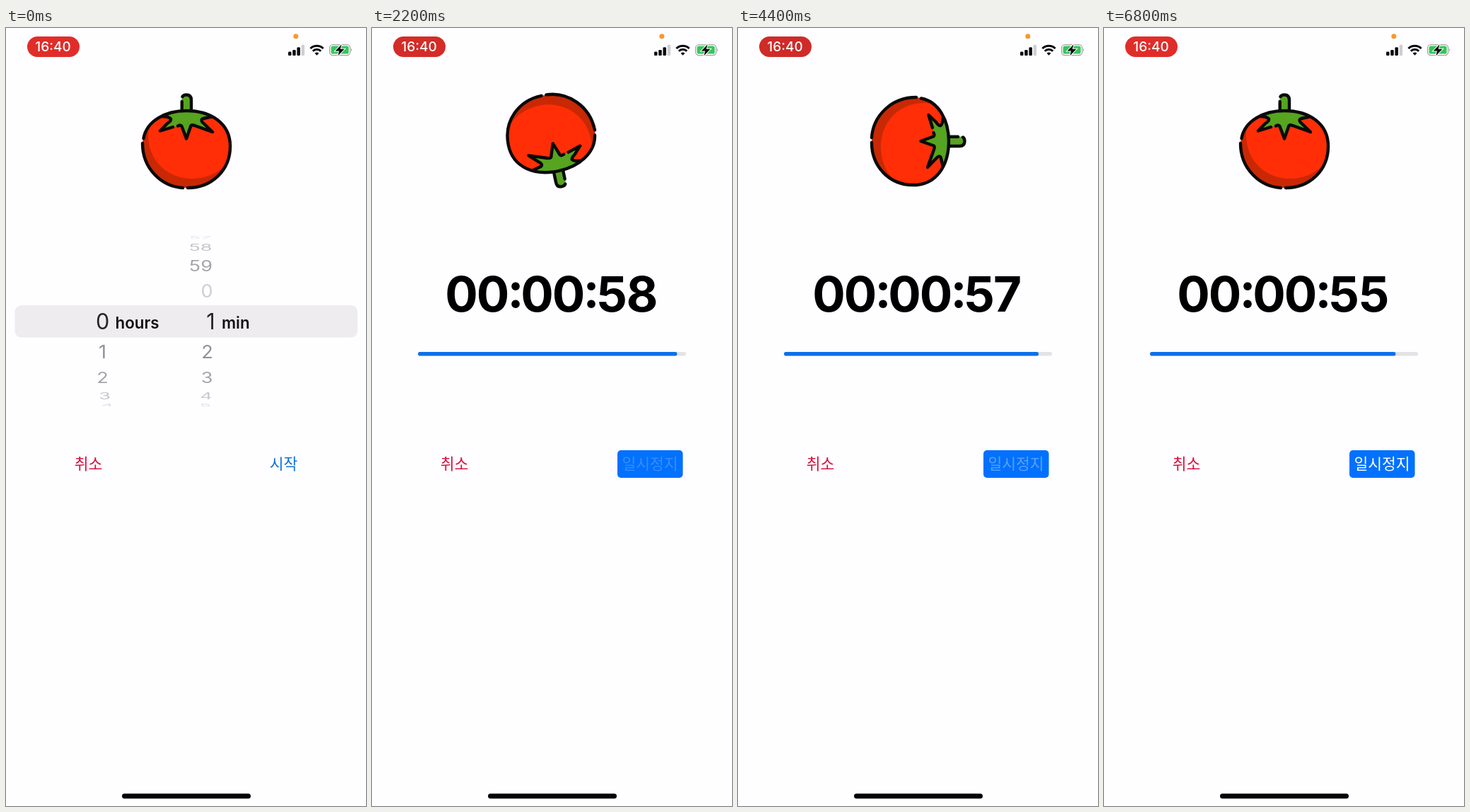
These frames come from a looping animation (509x1100 px, 6.9 s). An HTML page:

```html
<!DOCTYPE html>
<html lang="ko">
<head>
<meta charset="utf-8">
<title>Tomato timer</title>
<style>
  html, body { margin: 0; width: 100%; height: 100%; overflow: hidden; background: #fefdff; }
  svg { display: block; width: 100%; height: 100%; }
  text { font-family: Inter, Roboto, sans-serif; text-anchor: middle; }
  .ko { font: 400 21.5px "Noto Sans CJK KR", "Noto Sans CJK", sans-serif; }
  .unit { font-size: 22.3px; font-weight: 600; fill: #111; text-anchor: start; }
  .picked { font-size: 30.5px; fill: #252427; }
  #wheels { font-size: 27px; }
  #clock { font-size: 69px; font-weight: 700; font-feature-settings: "calt" 0; }
  .line { fill: none; stroke: #0b0a0a; stroke-width: 4.4; stroke-linecap: round; stroke-linejoin: round; }
</style>
</head>
<body>
<svg viewBox="0 0 509 1100">
  <defs>
    <path id="body" d="M255 117C290 117 317 135 317 167C317 202 290 226 255 226C220 226 193 200 193 165C193 137 220 117 255 117Z"/>
    <clipPath id="inBody"><use href="#body"/></clipPath>
  </defs>

  <!-- status bar -->
  <rect id="pill" x="30" y="12" width="74" height="29" rx="14.5"/>
  <text x="66.5" y="33.3" font-size="19" font-weight="500" fill="#fff">16:40</text>
  <circle cx="409.8" cy="11.8" r="3.5" fill="#f69a2b"/>
  <g fill="#0b0a0c">
    <rect x="399" y="33.5" width="4.5" height="5.5" rx="1.2"/>
    <rect x="405.2" y="31" width="4.5" height="8" rx="1.2"/>
    <rect x="411.4" y="27.3" width="4.5" height="11.7" rx="1.2"/>
    <rect x="417.6" y="23.8" width="4.5" height="15.2" rx="1.2" fill="#cfced1"/>
    <path d="M436.6 35.8A4 4 0 0 1 442.4 35.8L439.5 38.8Z"/>
    <path d="M430.4 29A13 13 0 0 1 448.6 29M433.8 32.7A8 8 0 0 1 445.2 32.7" fill="none" stroke="#0b0a0c" stroke-width="3"/>
  </g>
  <rect x="457.6" y="23.6" width="29" height="15" rx="4.5" fill="none" stroke="#a5a4a8" stroke-width="1.3"/>
  <rect x="459.6" y="25.6" width="25" height="11" rx="2.6" fill="#33c65a"/>
  <path d="M488 28.6Q490.2 31 488 33.6Z" fill="#a5a4a8"/>
  <path d="M474.5 23.3L465.5 32.6H471L469.3 39.3L478.5 29.7H472.7Z" fill="#0b0a0c" stroke="#fff" stroke-width="2" paint-order="stroke"/>

  <!-- tomato -->
  <g id="tomato">
    <path d="M248.5 117V99Q249 94.5 255 94.5Q262 94.5 262 101V117Z" fill="#56a41f"/>
    <use href="#body" fill="#c92805"/>
    <g clip-path="url(#inBody)"><use href="#body" x="8" y="-13" fill="#ff2e06"/>
      <rect x="225" y="112" width="62" height="12" fill="#56a41f"/></g>
    <path d="M220 125Q236 117 255 117Q276 117 291 125L277 129L292 146L262 137L255 156L248 137.5L236 140L218 145L233 130Z" fill="#56a41f"/>
    <g class="line">
      <path d="M194.5 156C199 131 226 117 255 117C290 117 317 135 317 167C317 202 290 226 257 226"/>
      <path d="M250 226C220 224 193 199 193 163"/>
      <path d="M221 125Q230 125 233 128.5Q234 131 228 135L218 145.5L236 140M243 138.5Q247 136.5 248.5 139L255 156.5L261.5 138Q263 136.5 267 138L292 147L277.5 133Q275 129 279 128L290 125.5"/>
      <path d="M248.7 116V104M249.5 97Q251 94.5 255 94.5Q262 94.5 262 102V116"/>
    </g>
  </g>

  <!-- duration picker -->
  <g id="picker">
    <rect x="12.5" y="392" width="484.5" height="45.5" rx="9" fill="#eeecef"/>
    <text class="picked" x="136.5" y="426">0</text>
    <text class="picked" x="289.5" y="426">1</text>
    <text class="unit" x="154.5" y="425">hours</text>
    <text class="unit" x="305" y="425">min</text>
    <g id="wheels"></g>
  </g>

  <!-- countdown -->
  <g id="countdown">
    <text id="clock"></text>
    <rect x="65" y="458" width="379" height="5.6" rx="2.8" fill="#e3e2e5"/>
    <rect id="bar" x="65" y="458" height="5.6" rx="2.8" fill="#0b70ea"/>
  </g>

  <!-- buttons -->
  <text class="ko" x="116.5" y="623.5" fill="#d60f3c">취소</text>
  <rect id="toggleBox" x="347" y="597" width="92.5" height="39" rx="5" fill="#0271fd"/>
  <text id="toggle" class="ko" y="623.5"></text>

  <rect x="164" y="1082.5" width="182" height="7" rx="3.5" fill="#050406"/>
</svg>
<script>
const $ = id => document.getElementById(id);
const LOOP = 6.9, TOTAL = 60;
const START = 0.79, PAUSE = 2.3, RESUME = 4.15;
const TICKS = [START, START + 1, RESUME, START + 4, START + 5];
const clamp = v => Math.min(1, Math.max(0, v));

// cubic-bezier(.42, 0, .58, 1)
function ease(x) {
  if (x <= 0 || x >= 1) return clamp(x);
  let lo = 0, hi = 1, s = 0.5;
  for (let i = 0; i < 20; i++) {
    s = (lo + hi) / 2;
    const bx = 1.26 * (1 - s) ** 2 * s + 1.74 * (1 - s) * s * s + s ** 3;
    if (bx < x) lo = s; else hi = s;
  }
  return s * s * (3 - 2 * s);
}

// Each row: label, x, centre y, vertical squash, grey level
const rows = [
  ["57", 275, 296, 0.2, 228], ["58", 275, 310, 0.5, 196], ["59", 275.5, 336, 0.78, 164],
  ["0", 284, 372, 0.95, 207],
  ["2", 284.5, 457.5, 0.95, 146], ["3", 284, 494, 0.78, 164], ["4", 283, 520, 0.5, 202], ["5", 282, 533, 0.2, 222],
  ["1", 136.5, 457.5, 0.95, 146], ["2", 136.5, 494, 0.78, 164], ["3", 139.5, 520, 0.5, 196], ["4", 143, 533, 0.2, 222]
];
$("wheels").innerHTML = rows.map(([label, x, y, k, g]) =>
  `<text transform="translate(${x} ${y}) scale(1 ${k})" y="9.8" fill="rgb(${g},${g},${g + 2})">${label}</text>`).join("");

const clock = $("clock");
clock.setAttribute("y", "401 401 395 401 401 395 401 401");

function showClock(left) {
  const narrow = left % 10 === 7 ? 2 : 0;
  const xs = [126.5, 171, 203, 233.5, 278, 310, 339.5, 382];
  clock.setAttribute("x", xs.map((x, i) => x + (i < 7 ? narrow : -narrow / 2)).join(" "));
  clock.textContent = "00:00:" + String(left).padStart(2, "0");
}

function tapAlpha(t) {
  return [START, PAUSE, RESUME].reduce((alpha, tap) => {
    const age = t - tap;
    return age > -0.1 && age < 0.5 ? 0.2 + 0.8 * ease((age - 0.15) / 0.35) : alpha;
  }, 1);
}

function draw(t) {
  const pulse = 0.5 + 0.5 * Math.cos(Math.PI * (t - 1.4));
  $("pill").setAttribute("fill", `rgb(${207 + 48 * pulse},${43 + 6 * pulse},${40 + 3 * pulse})`);

  // Every tick adds a full turn made of two eased half turns.
  const angle = TICKS.reduce((sum, at) =>
    sum + 180 * (ease((t - at) / 0.5) + ease((t - at - 0.5) / 0.5)), 0);
  $("tomato").setAttribute("transform", `rotate(${angle % 360} 255 160)`);

  const left = TOTAL - Math.max(1, TICKS.filter(at => t >= at).length);
  showClock(left);
  $("bar").setAttribute("width", 379 * left / TOTAL);

  const fade = ease((t - START) / 0.5);
  $("picker").setAttribute("opacity", 1 - fade);
  $("countdown").setAttribute("opacity", fade);

  const running = (t >= START && t < PAUSE) || t >= RESUME;
  const toggle = $("toggle");
  $("toggleBox").setAttribute("opacity", running ? 1 : 0);
  toggle.textContent = running ? "일시정지" : "시작";
  toggle.setAttribute("x", running ? 393 : 392.5);
  toggle.setAttribute("fill", running ? "#fff" : "#0b72dc");
  toggle.setAttribute("opacity", tapAlpha(t));
}

let begin;
function frame(now) {
  begin ??= now;
  draw((now - begin) / 1000 % LOOP);
  requestAnimationFrame(frame);
}
draw(0);
requestAnimationFrame(frame);
</script>
</body>
</html>
```
